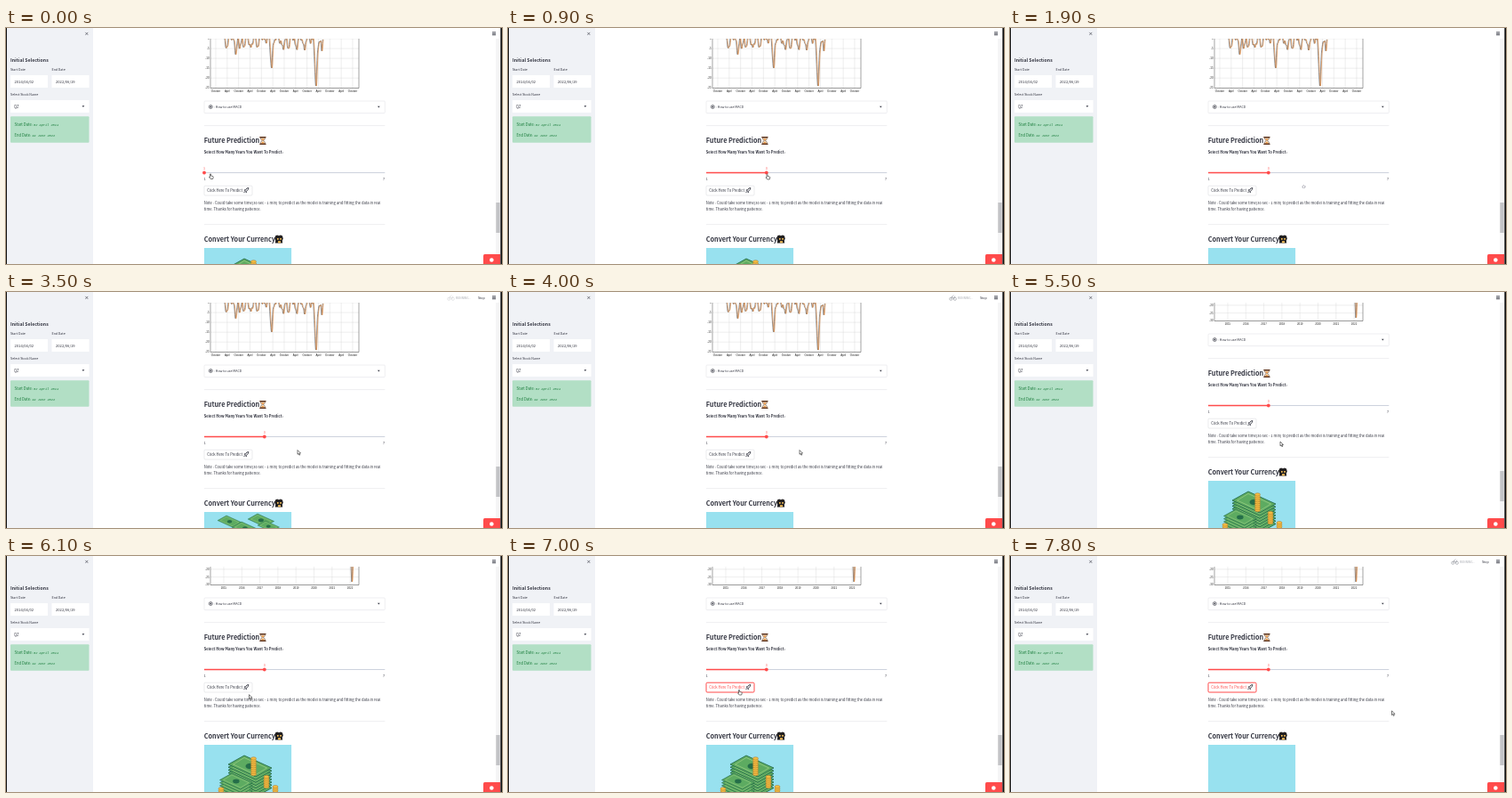
An HTML page that plays this animation: 558 px wide and 265 px high, repeating every 8 s.

```html
<!DOCTYPE html>
<html lang="en">
<head>
<meta charset="utf-8">
<title>Stock dashboard</title>
<style>
  html, body { margin: 0; height: 100%; overflow: hidden; background: #fff; }
  svg { display: block; width: 100vw; height: 100vh; }
  text { font: 4.15px "Noto Sans CJK JP", "Noto Sans CJK SC", "Open Sans", sans-serif; fill: #31333f; }
  .small { font-size: 3.62px; }
  .title { font-size: 7.25px; font-weight: 700; }
  .side { font-size: 5.2px; font-weight: 700; }
  .bold { font-weight: 700; }
  .green { fill: #177a39; }
  .code { font: italic 3.6px "Liberation Mono", monospace; fill: #177a39; }
  .tick { font: 2.95px "Liberation Sans", sans-serif; fill: #222; }
  .rule { stroke: #dedfe3; stroke-width: .5; }
</style>
</head>
<body>
<svg viewBox="0 0 558 265" preserveAspectRatio="none">
  <defs>
    <clipPath id="mainClip"><rect x="98" y="12" width="453" height="253"/></clipPath>
    <clipPath id="plotClip"><rect x="230" y="12" width="167" height="56"/></clipPath>
    <clipPath id="pictureClip"><rect x="223" y="247" width="98.3" height="60"/></clipPath>
  </defs>
  <rect width="558" height="265" fill="#fff"/>

  <g clip-path="url(#mainClip)"><g id="page">
    <g id="monthChart"></g>
    <g id="yearChart"></g>

    <rect x="223" y="82" width="203.3" height="13.6" rx="1" fill="#fff" stroke="#dcdde2" stroke-width=".5"/>
    <circle cx="230.3" cy="88.5" r="2" fill="none" stroke="#31333f" stroke-width=".6"/>
    <circle cx="230.3" cy="88.5" r=".9" fill="#31333f"/>
    <text class="small" x="234" y="89.9">: How to use MACD</text>
    <path d="M418 87.8h2.6l-1.3 1.6z" fill="#31333f"/>
    <path class="rule" d="M223 109.6H426.3M223 220.6H426.3"/>

    <text class="title" x="222.7" y="129.2">Future Prediction</text>
    <g>
      <path d="M286.3 123.2h5.2c0 2-1 2.700-2 3.300 1 .6 2 1.300 2 3.300h-5.200c0-2 1-2.700 2-3.300-1-.6-2-1.300-2-3.300z" fill="#f3dfc2" stroke="#4a2a1c" stroke-width=".5"/>
      <path d="M287.200 124.600h3.400l-1.700 1.700zM287 129.500l1.900-1.800 1.900 1.800z" fill="#ef8a2c"/>
      <path d="M285.300 122.600h7.200M285.300 130.400h7.200" stroke="#5a3019" stroke-width="1.300"/>
    </g>
    <text class="bold" x="222.700" y="141.200">Select How Many Years You Want To Predict:</text>

    <path d="M223 162.500H426.300" stroke="#cdd2dd" stroke-width="1"/>
    <path id="fill" stroke="#ff4b4b" stroke-width="1.300"/>
    <circle id="thumb" cy="162.500" r="1.900" fill="#ff4b4b"/>
    <text id="value" class="small" y="158.600" text-anchor="middle" style="fill:#ff4b4b"></text>
    <text class="small" x="222.800" y="170.800">1</text>
    <text class="small" x="424" y="170.800">7</text>

    <rect id="button" x="223" y="177.200" width="54" height="10.800" rx="1.100" fill="#fff"/>
    <text id="buttonText" x="226.200" y="184.100">Click Here To Predict</text>
    <path d="M268.600 183l2.300-3 2-.5-.5 2-2.800 2.500z" fill="#fff" stroke="#222531" stroke-width=".8"/>
    <path d="M269.400 181.300l-1.800.5.800 1zM271 183.400l-.4 1.800-1-.8zM267.400 185l.4-1.500 1 1z" fill="#222531"/>

    <text x="222.700" y="197.600">Note : Could take some time(30 sec - 1 min) to predict as the model is training and fitting the data in real</text>
    <text x="222.700" y="204.700">time. Thanks for having patience.</text>

    <text class="title" x="222.700" y="240.400">Convert Your Currency</text>
    <g>
      <path d="M303 233.500l2-.9 2 .6 2-.6 2 .9.800 3-1 2.200.4 2.700h-8.400l.4-2.700-1-2.200z" fill="#211f20"/>
      <path d="M305 236h1.700v1.700h-1.700zM308.200 236h1.700v1.700h-1.700zM306 239.300h3v2h-3z" fill="#f2bd57"/>
    </g>
    <g clip-path="url(#pictureClip)">
      <rect x="223" y="247" width="98.300" height="60" fill="#98e1ef"/>
      <g id="piles"></g>
      <g id="falling"></g>
    </g>
  </g></g>

  <g id="sidebar">
    <rect width="98" height="265" fill="#f0f2f6"/>
    <path d="M89.300 4.900l3 3m0-3l-3 3" stroke="#31333f" stroke-width=".6"/>
    <text class="side" x="5" y="37.800">Initial Selections</text>
    <text class="small" x="5" y="48.400">Start Date</text>
    <text class="small" x="51.500" y="48.400">End Date</text>
    <path d="M5 53h42v14H5zM51.500 53h42v14h-42zM5 81h88.500v14H5z" fill="#fff"/>
    <text x="9.500" y="61.500">2014/04/02</text>
    <text x="56" y="61.500">2022/06/19</text>
    <text class="small" x="5" y="76.400">Select Stock Name</text>
    <text x="9" y="89.500">QZ</text>
    <path d="M85.500 87.300h2.800l-1.400 1.600z" fill="#31333f"/>
    <rect x="5" y="99.200" width="88.500" height="29.600" rx="1" fill="#b2dfc5"/>
    <text class="green" x="9.600" y="110">Start Date:</text>
    <text class="code" x="31" y="109.900">02 April 2014</text>
    <text class="green" x="9.600" y="122">End Date:</text>
    <text class="code" x="29.200" y="121.900">19 June 2022</text>
  </g>

  <path d="M547 4.800h4M547 6.300h4M547 7.800h4" stroke="#31333f" stroke-width=".8"/>
  <g id="running">
    <g id="runIcon" fill="none" stroke="#777b84" stroke-width=".5">
      <circle cx="498.300" cy="7.700" r="1.600"/><circle cx="502.800" cy="7.700" r="1.600"/>
      <path d="M498.300 7.700l1.300-2.500 2 2.200 1.200-2.800M499.600 5.200l1.700-1.700"/>
    </g>
    <text class="small" x="506" y="7.600" style="fill:#a3a6ad;font-size:3.200px">RUNNING...</text>
    <text class="small" x="531" y="7.700">Stop</text>
  </g>

  <rect x="551" y="12" width="5" height="253" fill="#f5f5f6"/>
  <rect id="scrollThumb" x="551.300" width="4.400" height="34" fill="#c3c4c7"/>
  <path d="M537 265v-9.500q0-1.500 1.500-1.500H556v11z" fill="#ff4b4b"/>
  <circle cx="546.300" cy="260.500" r="2.300" fill="#fff"/>
  <path d="M0 0h1v265H0zM556.300 0H558v265h-1.700z" fill="#111"/>

  <g id="cursor" stroke="#222" stroke-width=".6" stroke-linejoin="round">
    <path id="arrow" d="M0 0v4.800l1.100-1 .8 1.900.9-.4-.8-1.800h1.500z" fill="#fff"/>
    <path id="hand" d="M0 .5q.6-1 1.100 0v2l2.200.5q.6.300.4 1.200l-.5 1.800H.700l-1.700-2q.1-.8 1 .1z" fill="#fff"/>
    <circle id="busy" cx="2.500" cy="0.700" r="1.500" fill="none" stroke="#667" stroke-dasharray="1.900 .5"/>
  </g>
</svg>
<script>
const LOOP = 8000;
const $ = id => document.getElementById(id);
const show = (id, on) => $(id).style.display = on ? '' : 'none';
const clamp = v => Math.max(0, Math.min(1, v));
const ease = (t, from, to) => { const p = clamp((t - from) / (to - from)); return p * p * (3 - 2 * p); };

// Charts: a wandering baseline with downward spikes [x, depth, width].
function curve(zero, from, to, wobble, spikes, shift) {
  const points = [];
  for (let x = from; x <= to; x += .4) {
    const wander = Math.sin(x * 1.27) + Math.sin(x * .73 + 2) + .7 * Math.sin(x * 2.9);
    let y = zero + wobble * wander;
    for (const [sx, depth, width] of spikes) y += depth * Math.exp(-(((x - sx) / width) ** 2));
    points.push(`${(x + shift).toFixed(1)},${y.toFixed(1)}`);
  }
  return points.join(' ');
}

function drawChart(id, { zero, step, rows, labels, x0, dx, from, to, wobble, spikes }) {
  let grid = '', text = '';
  for (let i = 0; i < rows; i++) {
    const y = zero + i * step;
    grid += `M230 ${y}H397`;
    text += `<text class="tick" x="228.600" y="${y + 1}" text-anchor="end">${i ? -5 * i : 0}</text>`;
  }
  labels.forEach((label, i) => {
    const x = x0 + i * dx;
    grid += `M${x} 0V67.500`;
    text += `<text class="tick" x="${x}" y="72.300" text-anchor="middle">${label}</text>`;
  });
  const line = (color, shift) =>
    `<polyline points="${curve(zero, from, to, wobble, spikes, shift)}" fill="none" stroke="${color}" stroke-width=".7"/>`;
  $(id).innerHTML = `<path d="${grid}" stroke="#d5d5d5" stroke-width=".4"/>${text}
    <g clip-path="url(#plotClip)">${line('#58606b', -.5)}${line('#dc8740', .2)}</g>
    <path d="M230 0V67.500H397V0" fill="none" stroke="#444" stroke-width=".5"/>`;
}

drawChart('monthChart', {
  zero: 12, step: 11.05, rows: 6, x0: 236, dx: 12.83, from: 246, to: 357, wobble: 2.2,
  labels: Array.from({ length: 13 }, (_, i) => i % 2 ? 'April' : 'October'),
  spikes: [[248, 7, 2], [259, 14, 1.5], [263, 10, 1.5], [268, 8, 1.5], [276, 9, 2], [283, 6, 2], [299, 31, 1.6],
    [312, 11, 2], [318, 8, 1.5], [327, 8, 2], [336, 11, 1.5], [349, 55, 1.7], [355.5, 16, 1]]
});
drawChart('yearChart', {
  zero: 15, step: 8.72, rows: 7, x0: 245, dx: 20.3, from: 231, to: 396, wobble: .9,
  labels: Array.from({ length: 8 }, (_, i) => 2015 + i),
  spikes: [[262, 3, 2], [289, 7, 1.5], [313, 5, 1.5], [330, 5, 1.5], [350.5, 26, 1.5], [367, 9, 1.5],
    [371, 12, 1.3], [378, 8, 2], [389.5, 51, 1.3]]
});

// Money picture
function bill(x, y, size = 1) {
  return `<g transform="translate(${x} ${y}) scale(${size})">
    <path d="M0 0L31 14 13 24-18 10z" fill="#5dab61" stroke="#1f6544" stroke-width=".8"/>
    <path d="M0 2.500L25.500 14 13 21.500-12.500 10z" fill="none" stroke="#a9d58b" stroke-width=".6"/>
    <ellipse cx="6.500" cy="12" rx="5" ry="3.200" fill="#256e49"/></g>`;
}
const pile = (x, y, count, size) =>
  Array.from({ length: count }, (_, i) => bill(x, y + (count - 1 - i) * 3.2, size)).join('');
const coins = (x, y, count) => Array.from({ length: count }, (_, i) =>
  `<ellipse cx="${x}" cy="${y - i * 2.2}" rx="3" ry="1.700" fill="#f4bd42" stroke="#a8732a" stroke-width=".5"/>`).join('');

$('piles').innerHTML = pile(268, 259, 8, 1) + coins(278.500, 280, 9) + coins(293, 294, 6) +
  pile(254, 279, 6, .75) + coins(242, 303, 4) + coins(303, 303, 5);
$('falling').innerHTML = bill(248, 251, .55) + bill(265, 258, .6) + bill(283, 249, .6) + bill(292, 257, .5);

// Cursor route as [time, x, y]
const route = [[0, 229.5, 163.5], [100, 229.5, 163.5], [900, 291, 164], [1200, 291, 164], [1900, 328, 177.5],
  [4900, 328, 177.5], [5400, 304, 168], [5600, 304, 168], [6400, 259.5, 150], [7300, 259.5, 150],
  [7700, 429.5, 173.8], [LOOP, 429.5, 173.8]];

function cursorAt(t) {
  const i = route.findIndex(([time], k) => k && t <= time);
  const [t0, x0, y0] = route[i - 1], [t1, x1, y1] = route[i];
  const p = ease(t, t0, t1);
  return [x0 + (x1 - x0) * p, y0 + (y1 - y0) * p];
}

function render(t) {
  const [cx, cy] = cursorAt(t);
  $('cursor').setAttribute('transform', `translate(${cx} ${cy})`);
  const hand = t < 1300 || (t > 6300 && t < 7380);
  const busy = t >= 1600 && t < 2200;
  show('hand', hand);
  show('busy', busy);
  show('arrow', !hand && !busy);

  const scroll = 35 * ease(t, 4750, 5350);
  $('page').setAttribute('transform', `translate(0 ${-scroll})`);
  $('scrollThumb').setAttribute('y', 196 + scroll / 7);

  const years = t < 950 ? Math.min(3, Math.max(1, Math.round(1 + (cx - 223) / 33.9))) : 3;
  const knob = 223 + (years - 1) * 33.9;
  $('thumb').setAttribute('cx', knob);
  $('value').setAttribute('x', knob);
  $('value').textContent = years;
  $('fill').setAttribute('d', `M223 162.500H${knob}`);

  const active = t >= 6250;
  $('button').setAttribute('stroke', active ? '#ff4b4b' : '#d5d6da');
  $('button').setAttribute('stroke-width', active ? 1 : .5);
  $('buttonText').style.fill = active ? '#ff4b4b' : '#31333f';

  show('monthChart', t < 4100);
  show('yearChart', t >= 4100);
  show('running', (t >= 2600 && t < 4700) || t >= 7500);
  $('runIcon').setAttribute('opacity', t < 4000 ? .4 : 1);

  show('piles', t < 1500 || (t >= 3700 && t < 7600));
  $('piles').setAttribute('transform', `translate(0 ${t < 3700 ? 0 : 45 * (1 - ease(t, 3700, 4300))})`);
  show('falling', t >= 3000 && t < 4100);
  $('falling').setAttribute('transform', `translate(0 ${(t - 3500) * .06})`);
}

function frame(now) {
  render(now % LOOP);
  requestAnimationFrame(frame);
}
render(0);
requestAnimationFrame(frame);
</script>
</body>
</html>
```
